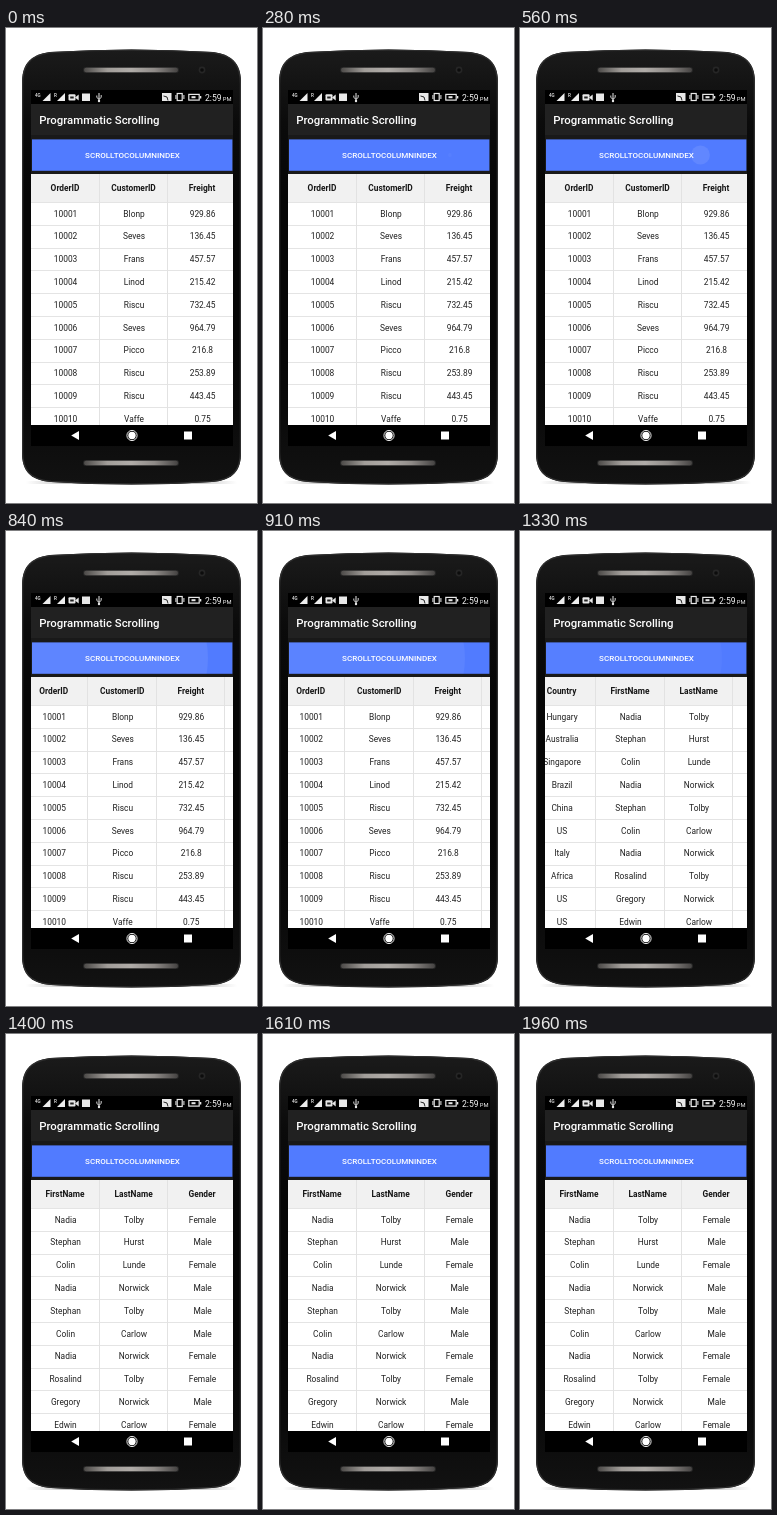
An HTML page with a canvas for the animation above (2.48 s loop, 251 by 475 pixels).

```html
<!DOCTYPE html>
<html lang="en">
<head>
<meta charset="utf-8">
<title>Programmatic Scrolling</title>
<style>
html, body { margin: 0; width: 100%; height: 100%; overflow: hidden; background: #fff; }
canvas { display: block; width: 251px; height: 475px; }
</style>
</head>
<body>
<canvas id="stage"></canvas>
<script>
const W = 251, H = 475, LOOP = 2480, STEP = 70;
const FONT = 'Roboto, "Noto Sans", sans-serif';
const canvas = document.getElementById('stage');
const ctx = canvas.getContext('2d');
const dpr = window.devicePixelRatio || 1;
canvas.width = W * dpr;
canvas.height = H * dpr;

const SCREEN = { x: 25, y: 62, w: 202, h: 356 };
const GRID = { x: 25, y: 146, w: 202, h: 251, head: 28, row: 22.8, col: 68.5 };
const BUTTON = { x: 26, y: 111.4, w: 200.4, h: 31.4 };

const heads = ['OrderID', 'CustomerID', 'Freight', 'Country', 'FirstName', 'LastName', 'Gender'];
const rows = `Blonp 929.86 Hungary Nadia Tolby Female
Seves 136.45 Australia Stephan Hurst Male
Frans 457.57 Singapore Colin Lunde Female
Linod 215.42 Brazil Nadia Norwick Male
Riscu 732.45 China Stephan Tolby Male
Seves 964.79 US Colin Carlow Male
Picco 216.8 Italy Nadia Norwick Female
Riscu 253.89 Africa Rosalind Tolby Female
Riscu 443.45 US Gregory Norwick Male
Vaffe 0.75 US Edwin Carlow Female`
  .split('\n').map((line, i) => [String(10001 + i), ...line.split(' ')]);

const body = new Path2D(`M16 56 C16 38 22 27 44 24 Q125.5 19 207 24 C229 27 235 38 235 56
  V424 C235 442 228 452 206 454 Q125.5 459 45 454 C23 452 16 442 16 424 Z`);

function rect(x, y, w, h, fill) {
  ctx.fillStyle = fill;
  ctx.fillRect(x, y, w, h);
}

function round(x, y, w, h, r, fill) {
  ctx.beginPath();
  ctx.roundRect(x, y, w, h, r);
  ctx.fillStyle = fill;
  ctx.fill();
}

function disc(x, y, r, fill) {
  ctx.beginPath();
  ctx.arc(x, y, r, 0, Math.PI * 2);
  ctx.fillStyle = fill;
  ctx.fill();
}

function shape(points, fill) {
  ctx.beginPath();
  points.forEach(([x, y]) => ctx.lineTo(x, y));
  ctx.closePath();
  ctx.fillStyle = fill;
  ctx.fill();
}

function line(points, color, width = 1) {
  ctx.beginPath();
  points.forEach(([x, y], i) => i ? ctx.lineTo(x, y) : ctx.moveTo(x, y));
  ctx.strokeStyle = color;
  ctx.lineWidth = width;
  ctx.stroke();
}

function text(str, x, y, size, weight, color, align = 'center') {
  ctx.font = `${weight} ${size}px ${FONT}`;
  ctx.textAlign = align;
  ctx.textBaseline = 'alphabetic';
  ctx.fillStyle = color;
  ctx.fillText(str, x, y);
}

function blend(x0, y0, x1, y1, colors) {
  const g = ctx.createLinearGradient(x0, y0, x1, y1);
  colors.forEach((c, i) => g.addColorStop(i / (colors.length - 1), c));
  return g;
}

function clipTo(b, draw) {
  ctx.save();
  ctx.beginPath();
  ctx.rect(b.x, b.y, b.w, b.h);
  ctx.clip();
  draw();
  ctx.restore();
}

// Linear interpolation through [time, value] pairs.
function track(t, keys) {
  if (t <= keys[0][0]) return keys[0][1];
  for (let i = 1; i < keys.length; i++) {
    const [t0, v0] = keys[i - 1], [t1, v1] = keys[i];
    if (t < t1) return v0 + (v1 - v0) * (t - t0) / (t1 - t0);
  }
  return keys[keys.length - 1][1];
}

function speaker(y) {
  round(77, y, 96, 6, 3, '#262626');
  round(78, y + 0.8, 94, 4.4, 2.2, blend(78, 0, 172, 0, ['#4c4a48', '#a19d99', '#b0aca8', '#8f8b88', '#454342']));
}

function phone() {
  rect(0, 0, W, H, '#fff');
  rect(20, 453, 211, 3, blend(20, 0, 231, 0, ['#fff', '#b5b5b5', '#888', '#b5b5b5', '#fff']));
  ctx.fillStyle = blend(0, 21, 0, 457, ['#1b1b1b', '#0b0b0b', '#060606', '#060606', '#060606', '#0a0a0a', '#121212']);
  ctx.fill(body);
  ctx.save();
  ctx.clip(body);
  ctx.strokeStyle = '#2e2e2e';
  ctx.lineWidth = 2.5;
  ctx.stroke(body);
  ctx.restore();
  speaker(39);
  speaker(432);
  disc(196, 42, 3.4, '#262626');
  disc(196, 42, 1.8, '#0c0c0c');
}

function signal(x) {
  shape([[x, 73], [x + 8, 73], [x + 8, 65]], '#ededed');
}

function statusBar() {
  rect(SCREEN.x, SCREEN.y, SCREEN.w, 14, '#000');
  const c = '#e8e8e8';
  text('4G', 29, 69, 4.6, 500, c, 'left');
  signal(36.5);
  text('R', 48, 69, 4.6, 500, c, 'left');
  signal(51);
  round(62.5, 66.2, 7, 6.4, 1, c);
  shape([[69, 69.4], [72.7, 66.4], [72.7, 72.4]], c);
  rect(64.2, 68.5, 3.5, 2, '#222');
  rect(76, 65.5, 8, 7.5, c);
  line([[93, 65], [93, 73]], c);
  line([[90.8, 67.5], [90.8, 69.5], [93, 71.3], [95.2, 69.5], [95.2, 67]], c, 0.9);
  disc(93, 73, 1.2, c);

  rect(156, 65, 9.5, 8, c);
  line([[157.5, 68], [161, 69], [162, 72.5]], '#111', 0.9);
  ctx.strokeStyle = c;
  ctx.lineWidth = 1.2;
  ctx.strokeRect(171.2, 65.5, 5, 7);
  rect(169.4, 67, 1, 4, c);
  rect(177.4, 67, 1, 4, c);
  ctx.strokeRect(182.8, 66.4, 10.4, 5.7);
  rect(194, 68, 1.3, 2.5, c);
  rect(185.5, 68.2, 4, 2, c);
  text('2:59', 199, 73, 8.6, 400, '#f4f4f4', 'left');
  text('PM', 216.8, 73, 5.8, 400, '#f4f4f4', 'left');
}

function ripple(t) {
  if (t >= 1400) return;
  const r = track(t, [[210, 0], [560, 9.5], [700, 57], [840, 90]]);
  const alpha = track(t, [[210, 0], [420, 0.09], [770, 0.09], [910, 0.06], [1260, 0.03]]);
  clipTo(BUTTON, () => disc(188.5 - 0.85 * r, 127, r, `rgba(255,255,255,${alpha})`));
}

function header(t) {
  rect(SCREEN.x, 76, SCREEN.w, 70, '#212121');
  text('Programmatic Scrolling', 33.2, 96, 11.4, 500, '#fff', 'left');
  rect(SCREEN.x, 107, SCREEN.w, 39, '#191919');
  rect(BUTTON.x, BUTTON.y, BUTTON.w, BUTTON.h, '#517bff');
  ripple(t);
  text('SCROLLTOCOLUMNINDEX', 126.5, 129.8, 8.05, 500, '#fff');
}

function scrollAt(t) {
  if (t < 770) return 0;
  if (t < 1330) return 11.3;
  return t < 1400 ? 223 : 4 * GRID.col;
}

function grid(t) {
  const shift = scrollAt(t);
  const top = GRID.y + GRID.head;
  rect(GRID.x, GRID.y, GRID.w, GRID.h, '#fff');
  rect(GRID.x, GRID.y, GRID.w, GRID.head, '#f1f1f1');
  for (let i = 0; i < rows.length; i++) {
    rect(GRID.x, Math.round(top + i * GRID.row), GRID.w, 1, '#e4e4e4');
  }
  heads.forEach((name, c) => {
    const left = 24.5 + c * GRID.col - shift;
    const mid = left + GRID.col / 2;
    rect(Math.floor(left + GRID.col), GRID.y, 1, GRID.h, '#e2e2e2');
    text(name, mid + 0.3, 162.9, 8.35, 700, '#161616');
    rows.forEach((row, i) => text(row[c], mid + 0.8, 188.5 + i * GRID.row, 8.4, 400, '#202020'));
  });
}

function navBar() {
  rect(SCREEN.x, 397, SCREEN.w, 21, '#000');
  shape([[65.2, 407.5], [73, 403], [73, 412]], '#fff');
  disc(126, 407.5, 3.7, '#fff');
  ctx.beginPath();
  ctx.arc(126, 407.5, 5.1, 0, Math.PI * 2);
  ctx.strokeStyle = '#fff';
  ctx.lineWidth = 0.9;
  ctx.stroke();
  rect(178, 403.5, 8, 8, '#fff');
}

function frame(now) {
  const t = Math.floor((now % LOOP) / STEP) * STEP;
  ctx.setTransform(dpr, 0, 0, dpr, 0, 0);
  phone();
  statusBar();
  header(t);
  clipTo(GRID, () => grid(t));
  navBar();
}

const start = performance.now();
function tick() {
  frame(performance.now() - start);
  requestAnimationFrame(tick);
}
tick();
</script>
</body>
</html>
```
